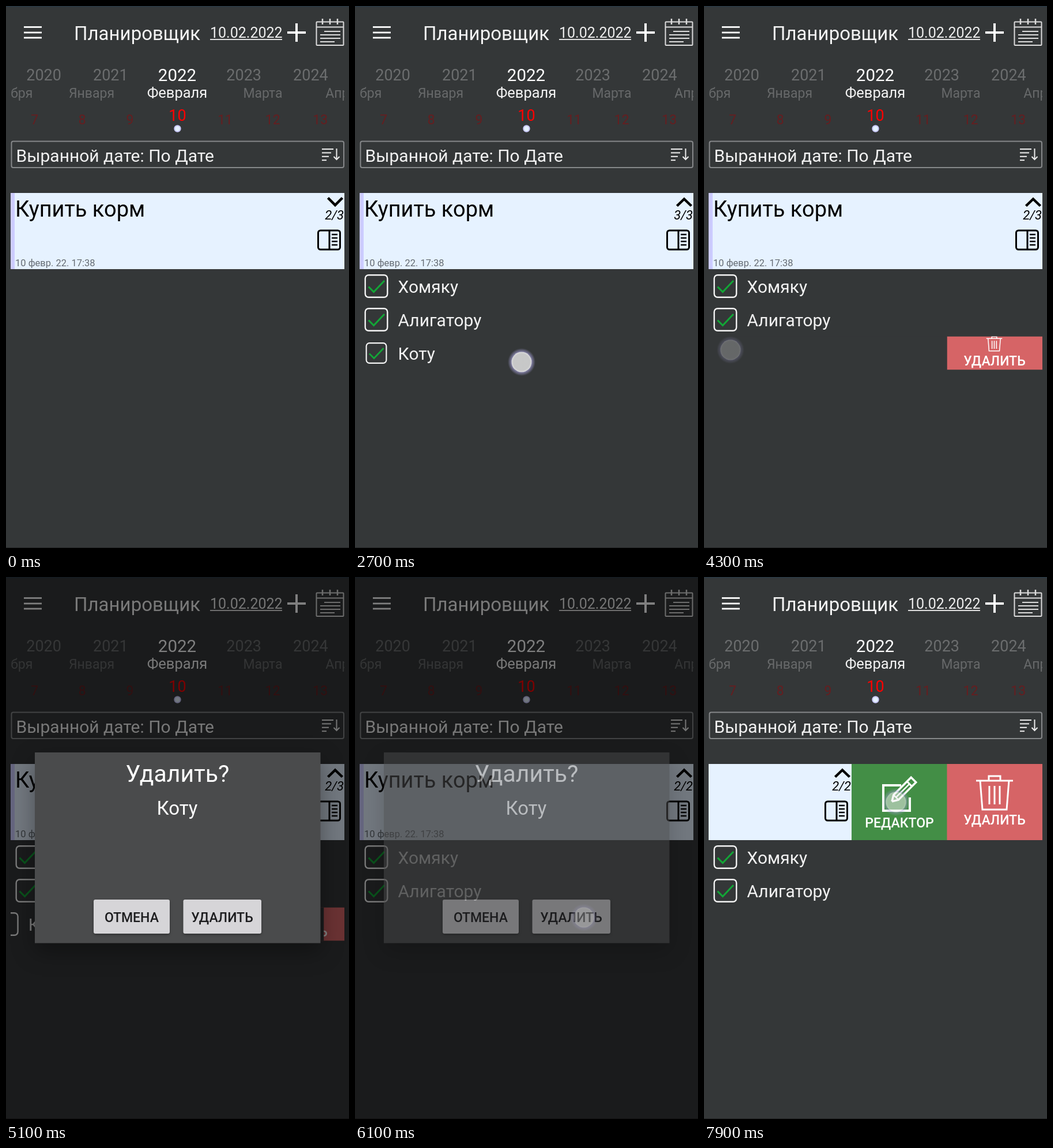
Animation, 595 px wide and 941 px high, one loop 8 s. Source, as an HTML page with a canvas:

```html
<!DOCTYPE html>
<html lang="ru">
<head>
<meta charset="utf-8">
<title>Планировщик</title>
<style>
html, body { margin: 0; width: 100%; height: 100%; overflow: hidden; background: #343738; }
canvas { display: block; }
</style>
</head>
<body>
<canvas id="stage" width="595" height="941"></canvas>
<script>
const W = 595, H = 941, LOOP = 8000;
const CARD = '#e6f2ff', RED = '#d66466', GREEN = '#438e46', BG = '#343738';
const screenCtx = document.getElementById('stage').getContext('2d');
let c = screenCtx;

const clamp = v => Math.max(0, Math.min(1, v));
const ramp = (t, from, to) => clamp((t - from) / (to - from));
const smooth = p => p * p * (3 - 2 * p);
const lerp = (a, b, p) => a + (b - a) * p;

function text(s, x, y, size, color, align = 'left', style = '') {
  c.font = `${style} ${size}px Roboto, sans-serif`;
  c.textAlign = align;
  c.fillStyle = color;
  c.fillText(s, x, y);
}

function rect(x, y, w, h, color) {
  c.fillStyle = color;
  c.fillRect(x, y, w, h);
}

function line(color, width, ...pts) {
  c.strokeStyle = color;
  c.lineWidth = width;
  c.beginPath();
  for (let i = 0; i < pts.length; i += 2) c.lineTo(pts[i], pts[i + 1]);
  c.stroke();
}

function box(x, y, w, h, r, color, width) {
  c.strokeStyle = color;
  c.lineWidth = width;
  c.beginPath();
  c.roundRect(x, y, w, h, r);
  c.stroke();
}

function clipped(x, y, w, h, draw) {
  c.save();
  c.beginPath();
  c.rect(x, y, w, h);
  c.clip();
  draw();
  c.restore();
}

function header() {
  for (const y of [36.5, 46, 55]) line('#fff', 2.8, 31, y, 62, y);
  text('Планировщик', 118, 59, 33, '#f4f4f4');
  text('10.02.2022', 354, 55, 25, '#eee');
  rect(354, 57, 125, 2, '#ddd');
  line('#fff', 4, 488, 46, 520, 46);
  line('#fff', 4, 504, 30, 504, 62);

  const ink = '#dcdcdc';
  box(538.5, 27.5, 47, 40.5, 1, ink, 2);
  line(ink, 2, 538, 36.5, 586, 36.5);
  for (const x of [549, 562, 575]) line(ink, 2.5, x, 22, x, 32);
  [[552, 580], [545, 580], [545, 580], [545, 570]].forEach(([a, b], i) =>
    line(ink, 2, a, 44 + i * 6, b, 44 + i * 6));
}

function pickers() {
  clipped(8, 90, 579, 140, () => {
    for (let i = -2; i <= 2; i++) {
      const on = i === 0;
      text(2022 + i, 297 + i * 115.7, on ? 130 : 129, on ? 29.5 : 27, on ? '#fff' : '#6b6d6e', 'center');
      const month = ['Декабря', 'Января', 'Февраля', 'Марта', 'Апреля'][i + 2];
      text(month, 297 + i * 148.5, 159, on ? 25.5 : 23, on ? '#f4f4f4' : '#67696a', 'center');
    }
    for (let i = -3; i <= 3; i++) {
      const on = i === 0;
      text(10 + i, 297.5 + i * 82.6, on ? 199 : 205, on ? 27 : 23, on ? '#f00' : '#651e20', 'center');
    }
  });
  c.beginPath();
  c.arc(297.5, 212.5, 5.2, 0, 7);
  c.fillStyle = '#e6f2ff';
  c.fill();
  c.strokeStyle = '#c8c8fa';
  c.lineWidth = 2;
  c.stroke();
}

function filterBar() {
  box(9.5, 234.5, 576.5, 45.5, 3, '#86888a', 2);
  text('Выранной дате: По Дате', 17.5, 270, 30, '#f2f2f2');
  [20, 16, 12, 8].forEach((w, i) => line('#eee', 2, 548, 248 + i * 6.4, 548 + w, 248 + i * 6.4));
  line('#eee', 2, 573.5, 247, 573.5, 266);
  line('#eee', 2, 568.5, 261, 573.5, 266, 578.5, 261);
}

// Trash can centred on x with its top at y; k scales the 64x60 shape.
function trash(x, y, k, width) {
  const at = (...p) => line('#fff', width, ...p.map((v, i) => i % 2 ? y + v * k : x + v * k));
  at(-32, 9, 32, 9);
  at(-10, 9, -10, 1, 10, 1, 10, 9);
  at(-25, 9, -21, 59, 21, 59, 25, 9);
  for (const dx of [-9, 0, 9]) at(dx, 18, dx, 50);
}

function editIcon() {
  line('#fff', 4, 342, 361, 311, 361, 311, 405, 357, 405, 357, 382);
  c.save();
  c.translate(326, 389);
  c.rotate(-Math.PI / 4);
  line('#fff', 3.5, 0, 0, 10, -6, 53, -6, 53, 6, 10, 6, 0, 0);
  line('#fff', 2.5, 10, -6, 10, 6);
  line('#fff', 2.5, 11, 0, 43, 0);
  line('#fff', 3, 43, -6, 43, 6);
  c.restore();
}

function card(shift, open, count) {
  clipped(8, 324, 579, 132, () => {
    if (shift > 0) {
      rect(256, 324, 166, 132, GREEN);
      rect(421.5, 324, 166, 132, RED);
      editIcon();
      text('РЕДАКТОР', 339, 434, 23, '#fff', 'center', '500');
      trash(504, 344, 1, 3);
      text('УДАЛИТЬ', 504, 429, 23, '#fff', 'center', '500');
    }
    c.translate(-shift, 0);
    rect(8, 324, 579, 132, CARD);
    rect(8, 324, 7, 132, '#ccccff');
    text('Купить корм', 16, 365, 38, '#000');
    text('10 февр. 22. 17:38', 16, 451, 16.5, '#656c73');
    const [end, tip] = open ? [346.5, 334.5] : [332.5, 345];
    line('#000', 4.5, 558.5, end, 571, tip, 583.5, end);
    text(count, 586, 370, 22, '#000', 'right', 'italic');
    box(541.5, 389, 38, 33, 4, '#000', 3);
    line('#000', 3, 561, 389, 561, 422);
    for (let y = 396; y < 416; y += 6) line('#000', 2.5, 565, y, 575, y);
  });
}

function item(label, index, checked, scale = 1, shift = 0) {
  const cy = 485.5 + index * 58;
  clipped(8, cy - 29, 579, 58, () => {
    if (shift > 0) {
      rect(421.5, cy - 29, 166, 58, RED);
      trash(503.5, cy - 29, 0.43, 1.5);
      text('УДАЛИТЬ', 504, cy + 21.5, 23, '#fff', 'center', '500');
      rect(8, cy - 29, 579 - shift, 58, BG);
    }
    c.translate(-shift, 0);
    text(label, 74.5, cy + 11.5, 30, '#f2f2f2');
    c.translate(37, cy);
    c.scale(scale, scale);
    box(-19.3, -19.3, 38.6, 38.6, 6, '#f4f4f4', 2.4);
    if (checked) line('#12a636', 3, -13.5, 1, -4.5, 10, 14, -9.5);
  });
}

function paintDialog() {
  c.shadowColor = 'rgba(0,0,0,.35)';
  c.shadowBlur = 36;
  c.shadowOffsetY = 14;
  rect(50, 304, 495.5, 330.5, '#4a4b4c');
  c.shadowBlur = 4;
  c.shadowOffsetY = 2;
  for (const [x, w] of [[152, 132], [307.5, 135.5]]) {
    c.fillStyle = '#d6d5d8';
    c.beginPath();
    c.roundRect(x, 559, w, 59, 3);
    c.fill();
  }
  c.shadowColor = 'transparent';
  text('Удалить?', 297.5, 355, 41, '#fff', 'center');
  text('Коту', 297, 411.5, 33, '#fff', 'center');
  text('ОТМЕНА', 218, 598, 23, '#1c1c1e', 'center', '500');
  text('УДАЛИТЬ', 375, 598, 23, '#1c1c1e', 'center', '500');
}

const dialog = document.createElement('canvas');
dialog.width = W;
dialog.height = H;
c = dialog.getContext('2d');
paintDialog();
c = screenCtx;

// start, fade-out start, from x, y, to x, y
const touches = [
  [400, 700, 290, 385, 290, 385],
  [2000, 2100, 287, 609, 287, 609],
  [2700, 2800, 289, 617, 289, 617],
  [3500, 4100, 300, 606, 46, 596],
  [4700, 4800, 504, 602, 504, 602],
  [5700, 5900, 397, 590, 397, 590],
  [6700, 7100, 277, 377, 50, 380],
  [7800, 7800, 352, 409, 333, 390]
];

function touch(t, [start, fade, x0, y0, x1, y1]) {
  if (t < start || t >= fade + 300) return;
  const p = smooth(ramp(t, start, fade + 100));
  const x = lerp(x0, x1, p), y = lerp(y0, y1, p);
  const disc = (r, stops) => {
    const g = c.createRadialGradient(x, y, 0, x, y, r);
    stops.forEach(([at, color]) => g.addColorStop(at, color));
    c.fillStyle = g;
    c.beginPath();
    c.arc(x, y, r, 0, 7);
    c.fill();
  };
  c.save();
  c.globalAlpha = 1 - ramp(t, fade, fade + 300);
  disc(24, [[0, 'rgba(165,160,215,0)'], [.68, 'rgba(165,160,215,0)'],
    [.74, 'rgba(165,160,215,.65)'], [1, 'rgba(165,160,215,0)']]);
  disc(17.5, [[0, 'rgba(240,240,240,.78)'], [.8, 'rgba(240,240,240,.78)'], [1, 'rgba(245,245,245,.86)']]);
  c.restore();
}

function press(t, at) {
  return t >= at && t < at + 200 ? 0.9 + 0.1 * ramp(t, at + 50, at + 200) : 1;
}

function draw(t) {
  const deleted = t >= 6050;
  const checked = t >= 2100 && t < 2800;
  const count = deleted ? '2/2' : checked ? '3/3' : '2/3';
  const rowShift = 165.5 * smooth(ramp(t, 3500, 4100)) * (1 - ramp(t, 4900, 5400)) ** 3;
  const cardShift = 331 * smooth(ramp(t, 6700, 7400));
  const dim = 0.5 * ramp(t, 4800, 5000) * (1 - ramp(t, 6100, 6500));
  const dialogAlpha = ramp(t, 4800, 5000) * (1 - ramp(t, 6000, 6200));

  rect(0, 0, W, H, BG);
  rect(0, 0, W, 2, '#2c3942');
  header();
  pickers();
  filterBar();
  card(cardShift, t >= 1000, count);

  clipped(8, 456, 579, 176 * smooth(ramp(t, 950, 1400)), () => {
    item('Хомяку', 0, true);
    item('Алигатору', 1, true);
    if (!deleted) item('Коту', 2, checked, press(t, 2000) * press(t, 2700), rowShift);
  });

  if (dim) rect(0, 0, W, H, `rgba(0,0,0,${dim})`);
  if (dialogAlpha) {
    c.globalAlpha = dialogAlpha;
    c.drawImage(dialog, 0, 0);
    c.globalAlpha = 1;
  }
  rect(0, 939, W, 2, '#000');
  touches.forEach(spec => touch(t, spec));
}

const begin = performance.now();
function tick() {
  const t = (performance.now() - begin) % LOOP;
  draw(Math.floor(t / 100) * 100);
  requestAnimationFrame(tick);
}
tick();
</script>
</body>
</html>
```
